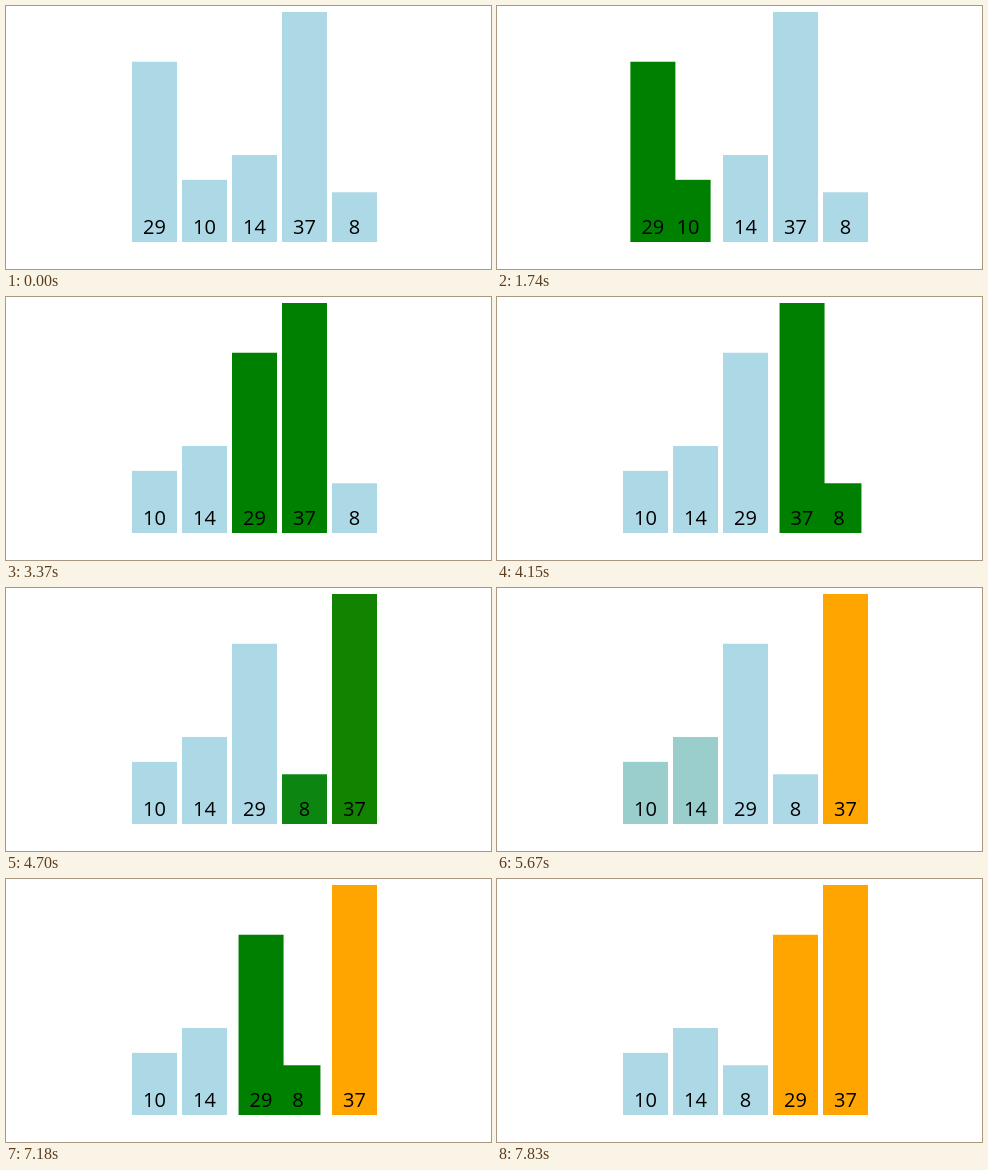
These frames come from a looping animation (485x263 px, 8000 ms). An HTML page:

```html
<!DOCTYPE html>
<html lang="en">
<head>
<meta charset="utf-8">
<title>Bubble sort</title>
<style>
  html, body { margin: 0; width: 100%; height: 100%; overflow: hidden; background: #fff; }
  svg { display: block; width: 100%; height: 100%; }
  text { font: 20px "Open Sans", "Noto Sans", sans-serif; text-anchor: middle; fill: #000; }
</style>
</head>
<body>
<svg id="stage" viewBox="0 0 485 263"></svg>
<script>
const LOOP = 8000;
const LEFT = 126, PITCH = 50, WIDTH = 45, FLOOR = 236, UNIT = 230 / 37;
const BLUE = [173, 216, 230], GREEN = [0, 128, 0], ORANGE = [255, 165, 0];
const START = [29, 10, 14, 37, 8];

// The picture advances in ticks: each step holds, then jumps along the easing curve.
const TICK = 100, TICK_SHARE = 0.48;

const paint = (at, end, colors, first = 0.3) => ({ at, end, colors, first });
const swap = (at, end, a, b, first = 0.32) => ({ at, end, pair: [a, b], first });

const EVENTS = [
  paint(1200, 1400, { 29: GREEN, 10: GREEN }),
  swap(1740, 1960, 29, 10, 0.333),
  paint(2170, 2380, { 10: BLUE, 14: GREEN }),
  swap(2720, 2930, 29, 14, 0.302),
  paint(3160, 3370, { 14: BLUE, 37: GREEN }),
  paint(3700, 3920, { 29: BLUE, 8: GREEN }),
  swap(4150, 4350, 37, 8),
  paint(4700, 4910, { 8: BLUE, 37: ORANGE }, 0.26),
  paint(5670, 5880, { 10: GREEN, 14: GREEN }),
  paint(6210, 6430, { 10: BLUE, 29: GREEN }, 0.37),
  paint(6640, 6850, { 14: BLUE, 8: GREEN }),
  swap(7180, 7400, 29, 8),
  paint(7730, 7830, { 8: BLUE, 29: ORANGE }, 0.4)
];

const mix = (a, b, k) => a + (b - a) * k;
const ease = t => t < 0.5 ? 4 * t ** 3 : 1 - 4 * (1 - t) ** 3;

function progress(event, time) {
  if (time >= event.end) return 1;
  const ticks = Math.floor((time - event.at) / TICK);
  return ease(Math.min(1, event.first + Math.min(ticks, 1) * TICK_SHARE));
}

const stage = document.getElementById("stage");
function add(tag, attrs) {
  const node = document.createElementNS("http://www.w3.org/2000/svg", tag);
  for (const key in attrs) node.setAttribute(key, attrs[key]);
  return stage.appendChild(node);
}

const bars = START.map(value => ({
  value,
  rect: add("rect", { y: FLOOR - value * UNIT, width: WIDTH, height: value * UNIT })
}));
for (const bar of bars) {
  bar.label = add("text", { y: 228 });
  bar.label.textContent = bar.value;
}

function stateAt(time) {
  const slot = {}, color = {};
  START.forEach((value, i) => { slot[value] = i; color[value] = BLUE; });
  for (const event of EVENTS) {
    if (time < event.at) break;
    const k = progress(event, time);
    if (event.pair) {
      const [a, b] = event.pair, from = slot[a], to = slot[b];
      slot[a] = mix(from, to, k);
      slot[b] = mix(to, from, k);
    }
    for (const value in event.colors) {
      const goal = event.colors[value];
      color[value] = color[value].map((c, i) => mix(c, goal[i], k));
    }
  }
  return { slot, color };
}

function draw(time) {
  const { slot, color } = stateAt(time);
  for (const { value, rect, label } of bars) {
    const x = LEFT + slot[value] * PITCH;
    rect.setAttribute("x", x);
    rect.setAttribute("fill", `rgb(${color[value].map(Math.round).join(",")})`);
    label.setAttribute("x", x + WIDTH / 2);
  }
}

const began = performance.now();
function frame() {
  draw((performance.now() - began) % LOOP);
  requestAnimationFrame(frame);
}
frame();
</script>
</body>
</html>
```
